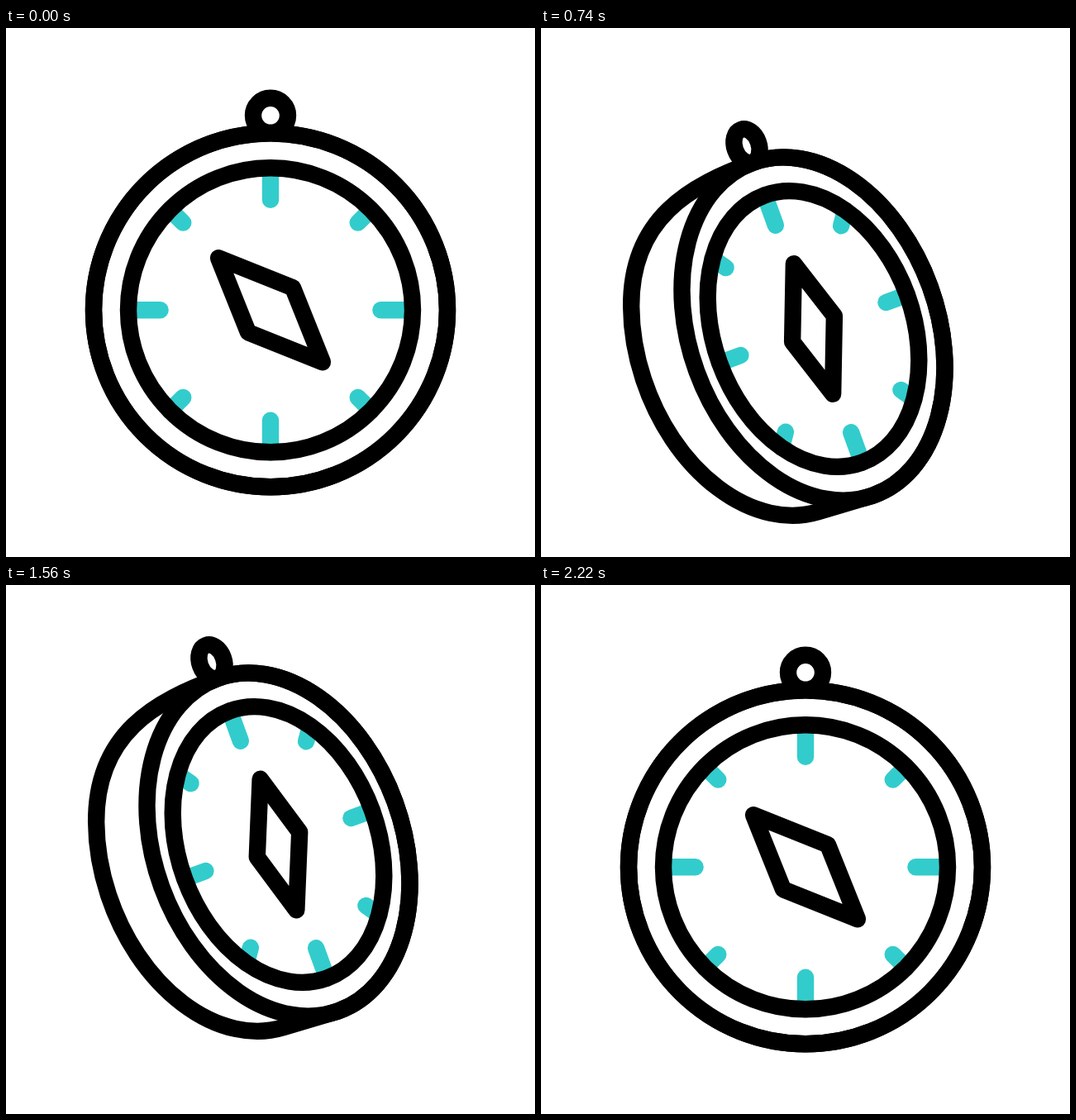
An HTML page with a canvas for the animation above (2.4 s loop, 640x640 px).

```html
<!DOCTYPE html>
<html lang="en">
<head>
<meta charset="utf-8">
<title>Compass</title>
<style>
  html, body { margin: 0; width: 100%; height: 100%; overflow: hidden; background: #fff; }
  canvas { display: block; }
</style>
</head>
<body>
<canvas id="stage" width="640" height="640"></canvas>
<script>
const ctx = document.getElementById('stage').getContext('2d');
const LOOP = 2400, RAD = Math.PI / 180;
const OUTER = 214, INNER = 172;

// Keys are [ms, value] pairs, eased in and out between neighbours.
const TILT = [[220, 0], [487, 1], [1898, 1], [2220, 0]];
const HEIGHT = [[220, 341.3], [740, 364], [1560, 314], [2220, 341.3]];
const SWING = [[380, 0], [740, -5.2], [1360, 19.7], [1930, -63], [2220, 0]];

const mix = (a, b, p) => a + (b - a) * p;

function valueAt(keys, t) {
  const next = keys.findIndex(([time]) => t < time);
  if (next === 0) return keys[0][1];
  if (next < 0) return keys[keys.length - 1][1];
  const [t0, a] = keys[next - 1], [t1, b] = keys[next];
  const u = (t - t0) / (t1 - t0);
  return mix(a, b, u * u * (3 - 2 * u));
}

// Builds a path inside a transform, then paints it with an even line width.
function shape(transform, build, color, fill) {
  ctx.save();
  transform();
  ctx.beginPath();
  build();
  ctx.restore();
  if (fill) {
    ctx.fillStyle = fill;
    ctx.fill();
  }
  ctx.strokeStyle = color;
  ctx.stroke();
}

const circle = (y, r) => () => ctx.arc(0, y, r, 0, 2 * Math.PI);

function draw(t) {
  const tilt = valueAt(TILT, t);
  const x = 320 + 9.5 * tilt, y = valueAt(HEIGHT, t);
  const turn = -20 * RAD * tilt, squeeze = 1 - 0.298 * tilt;

  const face = () => {
    ctx.translate(x, y);
    ctx.rotate(turn);
    ctx.scale(squeeze, 1);
  };

  // Offset of the back rim, in face coordinates.
  const skew = -0.17 * turn;
  const backX = -64 * tilt * Math.cos(skew) / squeeze;
  const backY = -64 * tilt * Math.sin(skew);
  const side = tilt ? Math.atan2(backY, backX) : Math.PI;
  const bottom = (side + 1.5 * Math.PI) % (2 * Math.PI);

  // The back rim ends at its left edge and curves over to the top of the front.
  const body = () => {
    const left = 207 * RAD, top = 1.5 * Math.PI;
    const handle = OUTER * mix(0.376, 0.53, tilt);
    const edgeX = backX + OUTER * Math.cos(left);
    const edgeY = backY + OUTER * Math.sin(left);
    ctx.arc(backX, backY, OUTER, bottom, left);
    ctx.bezierCurveTo(
      edgeX - handle * Math.sin(left), edgeY + handle * Math.cos(left),
      -handle, -OUTER, 0, -OUTER);
    ctx.arc(0, 0, OUTER, top, bottom + 2 * Math.PI);
    ctx.closePath();
  };

  const ticks = () => {
    for (let i = 0; i < 8; i++) {
      const c = Math.cos(i * Math.PI / 4), s = Math.sin(i * Math.PI / 4);
      const start = i % 2 ? 149.5 : 133.4;
      ctx.moveTo(start * c, start * s);
      ctx.lineTo(INNER * c, INNER * s);
    }
  };

  const needle = () => {
    const tipX = mix(-63, -16.4, tilt), tipY = mix(-63, -80.6, tilt);
    const sideX = mix(27, 26.7, tilt), sideY = mix(-27, -13.3, tilt);
    ctx.moveTo(tipX, tipY);
    ctx.lineTo(sideX, sideY);
    ctx.lineTo(-tipX, -tipY);
    ctx.lineTo(-sideX, -sideY);
    ctx.closePath();
  };

  ctx.fillStyle = '#fff';
  ctx.fillRect(0, 0, 640, 640);
  ctx.lineWidth = 20.4;
  ctx.lineCap = ctx.lineJoin = 'round';

  shape(face, circle(-235.5, 21), '#000');
  shape(face, body, '#000', '#fff');
  shape(face, circle(0, OUTER), '#000');
  shape(face, ticks, '#33cccc');
  shape(face, circle(0, INNER), '#000');
  shape(() => {
    ctx.translate(x, y);
    ctx.rotate(valueAt(SWING, t) * RAD);
  }, needle, '#000');
}

function tick() {
  draw(performance.now() % LOOP);
  requestAnimationFrame(tick);
}
tick();
</script>
</body>
</html>
```
